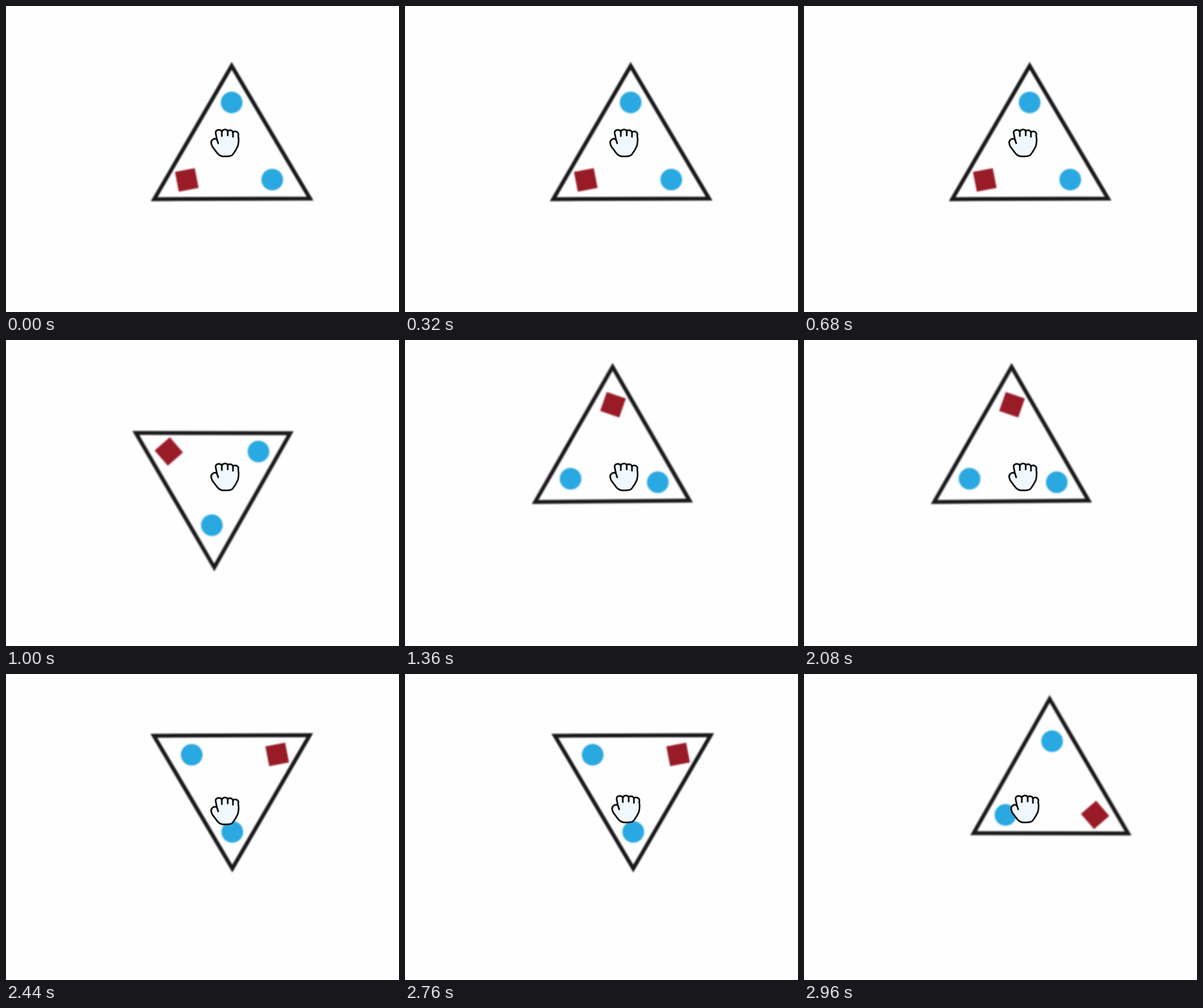
These frames come from a looping animation (600 px wide and 468 px high, 3 s). An HTML page:

```html
<!DOCTYPE html>
<html lang="en">
<head>
<meta charset="utf-8">
<title>Turning triangle</title>
<style>
  html, body { margin: 0; width: 100%; height: 100%; overflow: hidden; background: #fefefe; }
  svg { display: block; width: 600px; height: 468px; }
  #tri { filter: blur(.9px); }
  #hand { filter: blur(.4px); }
</style>
</head>
<body>
<svg viewBox="0 0 600 468">
  <g id="tri">
    <path d="M345 91.5L464 295H226Z" transform="rotate(-.2 345 227)" fill="none" stroke="#1a181b" stroke-width="6"/>
    <g fill="#29a8e1">
      <circle cx="344.5" cy="147.5" r="16.6"/>
      <circle cx="406.5" cy="265.5" r="16.6"/>
    </g>
    <rect x="-15.4" y="-15.4" width="30.8" height="30.8" transform="translate(276 266) rotate(-11)" fill="#981b27"/>
  </g>
  <g id="hand" fill="none" stroke="#0a0a0a" stroke-width="2.5" stroke-linejoin="round" stroke-linecap="round">
    <path id="palm" fill="#f1f8fd"/>
    <path id="creases"/>
  </g>
</svg>
<script>
  const LOOP = 3000, STEP = 40;
  const TURNS = [760, 1280, 2160, 2880];
  const PIVOT = '345 194.5';
  const DRAG = 3, DRAG_X = 2720, DRAG_Y = 2800;
  const $ = id => document.getElementById(id);

  // Knuckles are arcs between neighbouring gaps along the top of the fist.
  const gaps = [[320, 194], [329.5, 192], [338.5, 191], [346.5, 193], [354.5, 198]];
  const knuckles = gaps.slice(1).map(p => `A5 4.5 0 0 1 ${p}`).join('');
  $('palm').setAttribute('d', `M322 204L${gaps[0]}${knuckles}` +
    'Q356 207 354 214Q351 221 347 226Q345 230 337 230H331Q325 229 321 223L315 215Q311 207 316 204Q319 202 322 204Z');
  $('creases').setAttribute('d',
    gaps.slice(1, 4).map(([x, y]) => `M${x} ${y}v7`).join('') + 'M322 204l2 6');

  function draw(now) {
    const t = Math.floor(now % LOOP / STEP) * STEP;
    const turns = TURNS.filter(at => at <= t).length;
    const dx = t >= DRAG_X ? DRAG : 0;
    const dy = t >= DRAG_Y ? -DRAG : 0;
    $('tri').setAttribute('transform', `translate(${dx} ${dy}) rotate(${60 * turns} ${PIVOT})`);
    $('hand').setAttribute('transform', `translate(${dx} ${-dx})`);
  }

  const start = performance.now();
  function tick() {
    draw(performance.now() - start);
    requestAnimationFrame(tick);
  }
  tick();
</script>
</body>
</html>
```
